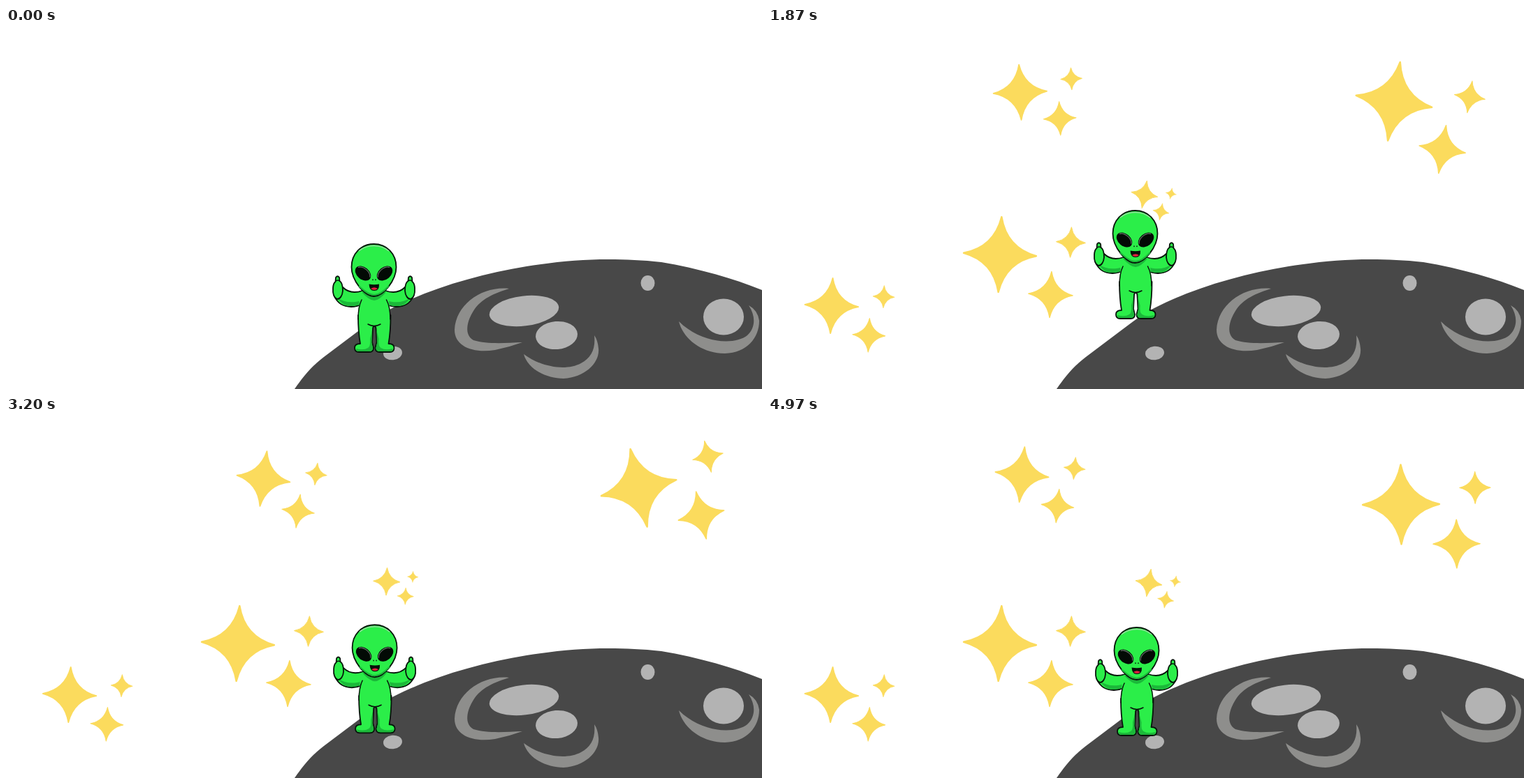
An HTML page that plays this animation: 1082x518 px, repeating every 5010 ms.

```html
<!DOCTYPE html>
<html lang="en">
<head>
<meta charset="utf-8">
<title>Alien on the moon</title>
<style>
html, body { margin: 0; width: 100%; height: 100%; overflow: hidden; background: #fff; }
svg { display: block; width: 100vw; height: 100vh; }
.skin { fill: #2bee49; stroke: #06150a; stroke-width: 1.8; stroke-linejoin: round; }
.shade { fill: #1cb83a; }
.line { fill: none; stroke: #06150a; stroke-width: 1.5; stroke-linecap: round; }
</style>
</head>
<body>
<svg viewBox="0 0 1082 518">
  <defs>
    <path id="star" d="M0-54 Q9-10 52 0 Q9 10 0 54 Q-9 10-52 0 Q-9-10 0-54Z"/>
    <g id="trio" fill="#fbdb5d" stroke="#fbdb5d" stroke-width="2.4" stroke-linejoin="round">
      <use href="#star"/>
      <use href="#star" transform="translate(100.6 -21.9) scale(.405)"/>
      <use href="#star" transform="translate(74.9 54.3) scale(.61)"/>
    </g>
    <g id="arm">
      <path class="skin" d="M510 377 C501 380 490 380 482 372 L470 385 C475 396 484 400 494 400 Q502 400 510 396Z"/>
      <path class="shade" d="M509 391 C496 395 484 394 474 387 C481 397 487 399 494 399 Q502 399 509 395Z"/>
      <path class="skin" d="M471.5 364 L472 358 Q474.5 354.5 477 358 L477.5 363 C481 365 482 371 482 377 C481.5 384 478 389 474 389 C469 387 467.5 380 468 373 Q468.5 366 471.5 364Z"/>
      <path class="line" d="M472 363 Q475 361 477.5 363" stroke-width="1"/>
    </g>
    <g id="leg">
      <path class="skin" d="M504 412 Q504 436 507 453 Q499 453 499 459 Q499 465 505 465 H520 Q526 465 526 459 L524 451 L525 432 Q525 428 527 428 V405Z"/>
      <path class="shade" d="M501 460 Q512 463 518 459 Q522 457 521 446 L524 434 L523.5 452 L525 459 Q525 464 519 464 H505 Q501 464 501 460Z"/>
    </g>
    <g id="eye" transform="rotate(40 511 352)">
      <ellipse cx="511" cy="352" rx="12.7" ry="8.7" fill="#030a05"/>
      <path d="M500 350 Q503 345 511 345 Q519 345 522 350" fill="none" stroke="#66756a" stroke-width="1.2"/>
    </g>
  </defs>

  <path fill="#484848" d="M413 518 C427 498 438 485 455 472 L516 426 C534 412 552 401 580 389 C630 367 690 351 745 342 C790 335 825 332 862 332 C888 332 910 333 938 336 C985 344 1035 357 1082 376 V518Z"/>
  <g fill="#8e8e8c">
    <path d="M720 374 C682 370 644 396 642 433 C642 457 668 467 700 462 Q720 458 739 451 C715 452 688 454 669 448 C655 440 660 420 669 406 C679 389 700 380 720 374Z"/>
    <path d="M741 468 C747 490 774 503 798 503 C829 501 850 480 848 460 Q847 448 842 441 C844 460 838 473 823 481 C803 492 768 488 741 468Z"/>
    <path d="M963 421 C969 446 996 467 1029 467 C1060 466 1078 445 1078 420 Q1076 405 1063 398 C1073 413 1073 430 1061 441 C1042 456 994 452 963 421Z"/>
  </g>
  <g fill="#b3b3b3">
    <ellipse cx="741.5" cy="406" rx="50" ry="21.5" transform="rotate(-7 741.5 406)"/>
    <ellipse cx="788" cy="441" rx="30" ry="20" transform="rotate(-5 788 441)"/>
    <ellipse cx="918.5" cy="366" rx="10" ry="11"/>
    <ellipse cx="1027" cy="414.5" rx="29" ry="26"/>
    <ellipse cx="553.5" cy="466.5" rx="13.5" ry="9.8" transform="rotate(-6 553.5 466.5)"/>
  </g>

  <g id="sky"></g>

  <g id="alien">
    <use href="#arm"/>
    <use href="#arm" transform="matrix(-1 0 0 1 1053 0)"/>
    <use href="#leg"/>
    <use href="#leg" transform="matrix(-1 0 0 1 1054.5 0)"/>
    <path fill="#2bee49" d="M508 378 H545 Q550 396 549.5 416 Q539 427 527 427 Q515 427 504.5 416 Q504 396 508 378Z"/>
    <path class="line" d="M509 390 Q504 400 504 418 M544.5 390 Q550 400 550 418 M518 425 Q527 430 536 425"/>
    <path class="shade" d="M509 379 Q520 391 527 391 Q534 391 544 379Z"/>
    <path class="skin" d="M526.5 310 C508 310 494.5 324 494.5 343 C494.5 362 513 385 526.5 385 C540 385 558.5 362 558.5 343 C558.5 324 545 310 526.5 310Z"/>
    <path fill="none" stroke="#1cb83a" stroke-width="2" d="M505 370 Q518 383 527 383 Q536 383 548 370"/>
    <path fill="none" stroke="#8fdc99" stroke-width="1.6" d="M505 320 Q514 312.500 527 312.500 Q539 312.500 548 320"/>
    <use href="#eye"/>
    <use href="#eye" transform="matrix(-1 0 0 1 1053 0)"/>
    <path class="line" stroke-width="1" d="M525 361v.5M529 361v.5"/>
    <path fill="#061008" d="M519.5 367.5 Q527 369 534 367.5 Q534.5 377 527 377 Q520 377 519.5 367.5Z"/>
    <path fill="#e0203f" d="M522 374 Q527 370.5 532 374 Q527 378 522 374Z"/>
  </g>
</svg>

<script>
const LOOP = 5.01;
const NS = 'http://www.w3.org/2000/svg';
const sky = document.getElementById('sky');
const alien = document.getElementById('alien');

// A swing of the given size that is highest at time "peak" (seconds).
const wave = (t, size, peak, period) => size * Math.cos(2 * Math.PI * (t - peak) / period);

function ease(t, from, to) {
  const p = Math.min(1, Math.max(0, (t - from) / (to - from)));
  return p * p * (3 - 2 * p);
}

// Each group sways freely in x, y and angle, or stands still.
const groups = [
  { start: .17, scale: .736, pose: t => [
    364.3 + wave(t, 5, 3.65, 4.8),
    89.5 + wave(t, 5, 1.9, 5.5) + wave(t, 2.5, 1.25, 1.45),
    4.5 + wave(t, 7, 4, 4.3)] },
  { start: .17, scale: 1.055, pose: t => [
    899.5 + wave(t, 6.5, 1.23, 1.87),
    109.5 + wave(t, 9, .4, 4.5) + wave(t, 7, 2.5, 2.5),
    wave(t, 6, 1.7, 4) + wave(t, 8, 1.22, .8)] },
  { start: .27, scale: .37, pose: t => [
    541 + wave(t, 4, 1.23, 1.87),
    235.7 + wave(t, 3.2, 1.87, 1.08),
    4.5 + wave(t, 8, 2.25, 3.2)] },
  { start: .73, scale: 1, pose: () => [332, 325, 2.5] },
  { start: 1.125, scale: .736, pose: () => [91, 398.5, 2.5] }
];

function make(tag, parent, attrs = {}) {
  const el = document.createElementNS(NS, tag);
  for (const name in attrs) el.setAttribute(name, attrs[name]);
  return parent.appendChild(el);
}

// Blur with a hard alpha cut lets the stars sharpen out of round blobs.
groups.forEach((g, i) => {
  const filter = make('filter', sky, { id: 'grow' + i, filterUnits: 'userSpaceOnUse',
    x: 0, y: 0, width: 1082, height: 518, 'color-interpolation-filters': 'sRGB' });
  g.blur = make('feGaussianBlur', filter);
  make('feFuncA', make('feComponentTransfer', filter), { type: 'linear', slope: 14, intercept: -8.6 });
  g.layer = make('g', sky);
  g.stars = make('use', g.layer, { href: '#trio' });
});

function draw(t) {
  groups.forEach((g, i) => {
    const p = (t - g.start) / .3;
    const blur = p < 1 ? 11 * (1 - p) ** 2 : 0;
    const [x, y, angle] = g.pose(t);
    g.layer.setAttribute('display', p < 0 ? 'none' : 'inline');
    g.layer.setAttribute('filter', blur > .1 ? `url(#grow${i})` : 'none');
    g.blur.setAttribute('stdDeviation', blur);
    g.stars.setAttribute('transform', `translate(${x} ${y}) rotate(${angle}) scale(${g.scale})`);
  });
  const rise = ease(t, .82, 1.72), fall = ease(t, 2.35, 3.4);
  const drift = ease(t, 1.9, 2.7);
  alien.setAttribute('transform', `translate(${3 * drift - rise - fall} ${40 * fall - 48 * rise})`);
}

const begin = performance.now();
function tick() {
  draw((performance.now() - begin) / 1000 % LOOP);
  requestAnimationFrame(tick);
}
tick();
</script>
</body>
</html>
```
